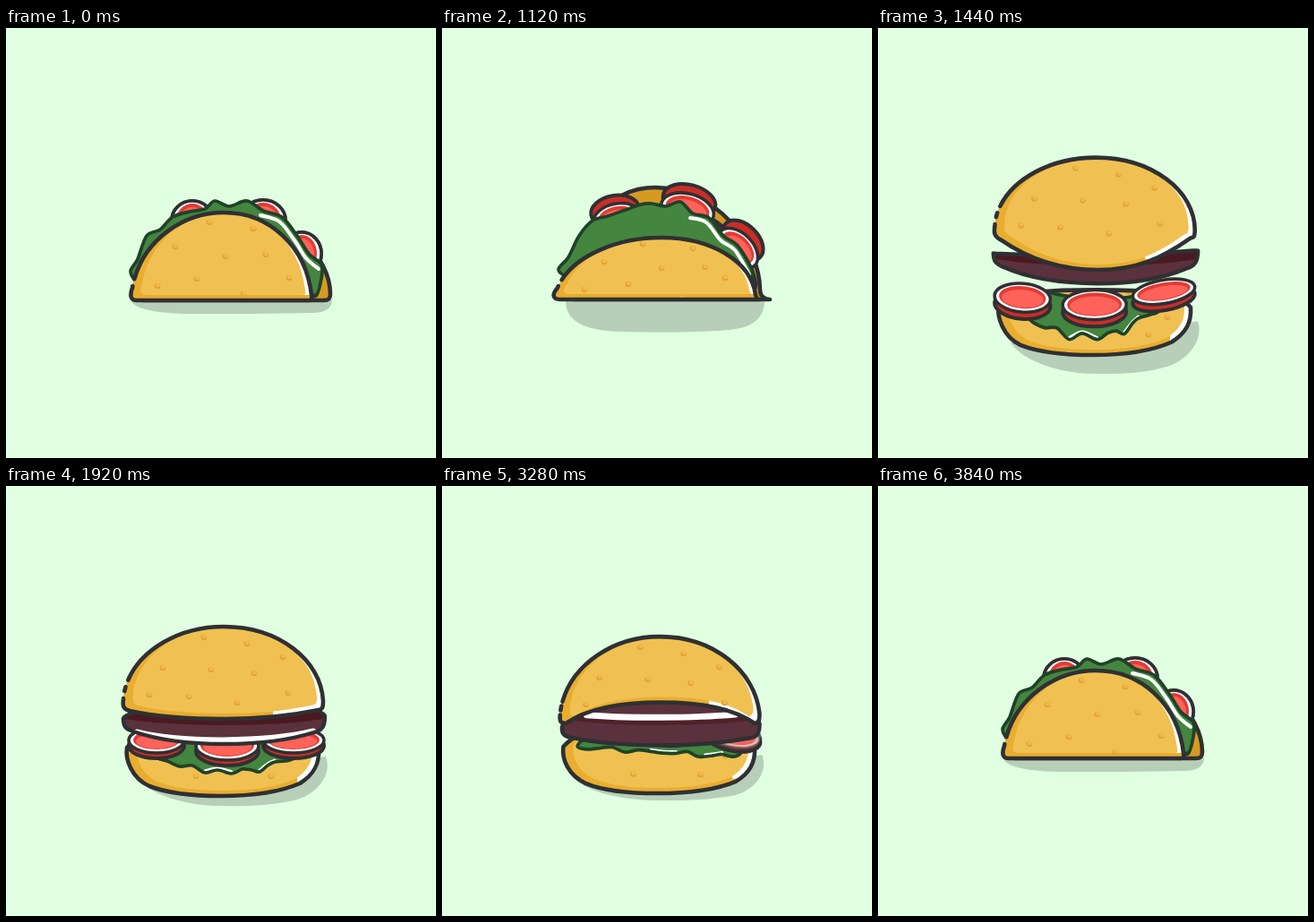
These frames come from a looping animation (480 by 480 pixels, 4.64 s). An HTML page with a canvas:

```html
<!DOCTYPE html>
<html lang="en">
<head>
<meta charset="utf-8">
<title>Taco and burger</title>
<style>
html, body { margin: 0; width: 100%; height: 100%; overflow: hidden; background: #e1ffe1; }
canvas { display: block; width: 100vw; height: 100vh; }
</style>
</head>
<body>
<canvas id="stage"></canvas>
<script>
const LOOP = 4640, STEP = 40, SIZE = 480;
const INK = '#2f3033', LEAF_INK = '#1f4228';
const GOLD = [240, 193, 82], SHADE = [233, 173, 47], INSIDE = [214, 154, 34];

// Poses: 0 taco, 1 tilting, 2 opening, 3 burger.
const nums = s => s.match(/-?[\d.]+/g).map(Number);
const poses = (...list) => list.map(nums);

const shadow = poses(
  'M140 304C142 313 165 318 200 319C250 319 300 319 345 318C358 317 364 312 364 303',
  'M138 304C138 325 155 338 200 339C250 340 280 340 320 337C345 335 360 325 360 304',
  'M140 318C150 332 190 339 230 340C270 341 300 340 330 337C352 332 364 318 358 297',
  'M146 325C160 345 200 356 235 357C275 358 300 356 325 350C350 342 364 320 357 302');

const topBun = poses(
  'M150 298C153 247 195 207 255 207C315 207 362 255 362 297C362 303 359 304 355 304C310 304 290 304 250 304C210 304 170 304 153 304C150 304 149 302 150 298',
  'M145 290C148 235 180 178 238 178C305 178 354 240 355 292C355 300 361 303 366 303C310 303 290 303 250 303C210 303 170 303 148 303C145 303 144 300 145 290',
  'M133 288C137 232 185 187 243 187C302 187 345 228 355 276C356 284 354 290 350 291C335 236 296 210 243 210C190 210 152 238 140 288C136 293 133 292 133 288',
  'M131 238C134 195 182 157 243 157C305 157 352 195 354 240C354 248 353 249 349 250C320 256 290 260 245 260C200 260 165 257 138 251C131 249 130 246 131 238');

const patty = poses(
  'M150 290C155 245 200 212 250 212C300 212 340 245 348 290C348 298 346 300 340 300C310 300 290 300 250 300C210 300 180 300 158 300C152 300 150 296 150 290',
  'M145 285C150 235 190 198 245 198C300 198 340 235 350 285C350 295 345 300 340 300C310 300 290 300 250 300C210 300 180 300 158 300C150 300 145 295 145 285',
  'M139 285C150 238 190 210 243 210C296 210 338 240 352 280C352 290 350 292 345 292C310 292 280 292 243 292C200 292 170 292 145 292C140 292 138 290 139 285',
  'M131 260C131 250 190 246 243 246C300 246 355 246 356 257C356 268 353 273 344 275C315 284 285 288 245 288C200 288 165 282 142 274C133 271 131 268 131 260');

const pattyShine = poses(
  'M200 235C225 220 265 220 300 235',
  'M190 225C225 208 260 208 300 225',
  'M188 223C223 212 263 212 300 223',
  'M146 275C192 287 290 287 343 274');

const bottomBun = poses(
  'M141 290C150 240 195 206 243 206C295 206 335 245 341 298C342 304 340 304 338 304C310 304 280 304 245 304C210 304 175 304 146 304C139 304 138 299 141 290',
  'M129 290C142 258 190 234 245 234C300 234 345 260 350 298C352 303 352 303 354 303C310 303 280 303 245 303C210 303 170 303 132 303C124 303 122 298 129 290',
  'M136 290C150 268 195 250 243 250C295 250 335 268 349 290C350 305 342 319 328 326C305 335 275 338 240 338C205 338 180 335 162 327C142 318 135 305 136 290',
  'M135 292C150 275 195 270 243 270C295 270 335 275 349 294C350 310 344 322 328 332C305 342 275 346 240 346C205 346 180 343 160 335C140 326 133 305 135 292');

// Upper edge left to right, then lower edge back.
const lettuce = poses(
  '139 272 147 258 157 232 172 225 186 211 205 205 222 202 233 193 249 199 269 193 287 204 308 211 325 232 338 252 352 264 ' +
  '352 280 346 298 335 290 326 262 312 244 300 232 285 222 270 216 256 214 243 214 225 216 205 222 180 238 160 262 148 283',
  '130 270 141 256 153 232 168 215 185 210 205 203 222 197 234 196 250 199 266 194 280 207 298 212 314 232 330 243 346 270 ' +
  '346 285 342 290 332 272 320 264 310 256 298 252 286 248 272 245 258 244 245 244 230 244 212 246 190 252 165 264 145 278',
  '136 291 146 274 160 262 175 253 190 246 205 241 220 238 233 236 248 235 265 237 282 240 300 246 318 255 335 267 350 284 ' +
  '352 291 344 294 334 285 321 282 312 273 303 276 290 263 278 260 265 266 253 256 238 265 222 270 206 265 180 274 160 287',
  '160 290 170 284 182 280 194 280 206 280 218 280 230 280 242 280 254 280 266 280 278 280 290 280 302 280 314 282 326 290 ' +
  '322 303 312 307 300 308 292 312 283 319 274 317 264 316 252 321 236 317 222 320 208 312 194 313 180 307 170 304 162 298');

// cx, cy, rx, ry, angle, rim dx, rim dy, face opacity
const tomatoes = [
  poses('208 215 23 22 0 0 0 1', '196 213 27 17 -10 -3 -9 1', '192 240 30 7 -17 0 0 0', '168 284 31 14 0 0 6 1'),
  poses('287 215 25 23 0 0 0 1', '274 203 30 18 15 2 -10 1', '266 239 33 14 3 0 0 0', '247 290 35 16 0 0 6 1'),
  poses('330 252 22 24 0 0 0 1', '330 246 27 17 45 6 -9 1', '328 264 30 17 35 0 0 0', '321 284 34 14 0 0 6 1')];

const bottomDots = poses(
  '227 217 276 224 189 244 245 255 290 253 316 279 169 288 213 280 265 297',
  '224 241 280 246 181 261 245 268 294 267 316 279 159 292 208 286 267 302',
  '224 256 280 252 191 279 249 286 290 273 309 297 120 330 216 318 276 319',
  '224 270 280 272 191 285 249 290 290 292 320 304 110 340 212 324 296 324');
const topDots = nums('221 169 269 176 175 203 229 205 277 209 309 191 160 233 204 235 258 242 315 231');

const glint = poses('280 298', '285 297', '322 321', '325 330'); // left and lower limits
const gap = poses('8', '8', '0.01', '0.01');

// time, value
const poseTrack = [[0, 0], [880, 0], [960, .12], [1040, .5], [1120, 1], [1240, 2], [1360, 3], [1440, 3.28],
  [1520, 3.12], [1600, 2.95], [1720, 3.03], [1840, 2.99], [1920, 3], [3080, 3], [3160, 3.2], [3240, 3.05],
  [3340, 2], [3440, 1], [3520, .55], [3560, .36], [3600, .2], [3640, .08], [3720, -.05], [3840, 0], [LOOP, 0]];
const topTrack = [[0, 0], [1360, 0], [1440, -4], [1560, 4], [1680, -2], [1920, 0], [3080, 0], [3160, -6], [3280, 0], [LOOP, 0]];
const lowTrack = [[0, 0], [1320, 0], [1360, 4], [1440, 24], [1560, -5], [1680, 3], [1920, 0], [3080, 0], [3160, 5], [3280, 0], [LOOP, 0]];

const canvas = document.getElementById('stage');
const g = canvas.getContext('2d');
const clamp = v => Math.max(0, Math.min(1, v));
const mix = (a, b, k) => a.map((v, i) => v + (b[i] - v) * k);
const rgb = c => `rgb(${c.map(Math.round)})`;

function valueAt(track, t) {
  const i = Math.max(1, track.findIndex(k => k[0] > t));
  const [a, u] = track[i - 1], [b, v] = track[i];
  return u + (v - u) * (t - a) / (b - a);
}

function at(shape, p) {
  const i = Math.max(0, Math.min(2, Math.floor(p)));
  return mix(shape[i], shape[i + 1], p - i);
}

function curve(n, closed = true) {
  const path = new Path2D();
  path.moveTo(n[0], n[1]);
  for (let i = 2; i < n.length; i += 6) path.bezierCurveTo(...n.slice(i, i + 6));
  if (closed) path.closePath();
  return path;
}

function spline(n, closed = true) {
  const count = n.length / 2, path = new Path2D();
  const pt = i => {
    const j = closed ? (i + count) % count : Math.max(0, Math.min(count - 1, i));
    return [n[2 * j], n[2 * j + 1]];
  };
  path.moveTo(n[0], n[1]);
  for (let i = 0; i < (closed ? count : count - 1); i++) {
    const [a, b, c, d] = [pt(i - 1), pt(i), pt(i + 1), pt(i + 2)];
    path.bezierCurveTo(b[0] + (c[0] - a[0]) / 6, b[1] + (c[1] - a[1]) / 6,
      c[0] - (d[0] - b[0]) / 6, c[1] - (d[1] - b[1]) / 6, c[0], c[1]);
  }
  return path;
}

function fill(path, color) { g.fillStyle = color; g.fill(path); }
function line(path, color, width) {
  g.strokeStyle = color;
  g.lineWidth = width;
  g.stroke(path);
}
function clipped(path, draw) {
  g.save();
  g.clip(path);
  draw();
  g.restore();
}
function disc(x, y, rx, ry, angle = 0) {
  const path = new Path2D();
  path.ellipse(x, y, Math.max(.1, rx), Math.max(.1, ry), angle, 0, Math.PI * 2);
  return path;
}

function dots(n) {
  for (let i = 0; i < n.length; i += 2) {
    fill(disc(n[i], n[i + 1], 3.4, 3.2), '#e3a432');
    fill(disc(n[i] + .5, n[i + 1] - 1, 2.5, 2.2), '#f1b94a');
  }
}

// A bread piece: shaded left and below, glossy on the right.
function bread(n, light, shade, limits, shine, dash, drawDots) {
  const path = curve(n);
  const [left, top, right, bottom] = [n[0], n[7], n[12], n[25]];
  fill(path, rgb(shade));
  clipped(path, () => {
    g.globalAlpha = shine;
    g.fillStyle = '#fff';
    g.fillRect(limits[0], 0, SIZE, limits[1]);
    g.globalAlpha = 1;
    g.save();
    const sx = (right - left - 18) / (right - left), sy = (bottom - top - 6) / (bottom - top);
    g.translate(left + 11, top);
    g.scale(sx, sy);
    g.translate(-left, -top);
    fill(path, rgb(light));
    g.restore();
    drawDots();
  });
  g.setLineDash(dash);
  line(path, INK, 4.6);
  g.setLineDash([]);
}

function drawTopBun(p) {
  const n = at(topBun, p), k = clamp((p - 2) * 1.8);
  const pos = topDots.map((v, i) => i % 2 ? n[7] + v - 157 : n[0] + (v - 131) * (n[12] - n[0]) / 223);
  const hole = 8 * clamp(p - 2) + .01;
  bread(n, mix(INSIDE, GOLD, k), mix(INSIDE, SHADE, k), [298, 262], k, [1, hole, 5, hole, 3000], () => {
    g.globalAlpha = k;
    dots(pos);
    g.globalAlpha = 1;
  });
}

function drawBottomBun(p) {
  const hole = Math.max(.01, at(gap, p)[0]);
  bread(at(bottomBun, p), GOLD, SHADE, at(glint, p), 1, [2, hole, 3000], () => dots(at(bottomDots, p)));
}

function drawPatty(p) {
  const path = curve(at(patty, p));
  fill(path, '#5a313c');
  clipped(path, () => {
    g.globalAlpha = clamp((p - 2.3) * 2);
    line(curve(nums('M134 254C190 263 300 263 353 254'), false), '#4a1921', 12);
    g.globalAlpha = 1;
    line(curve(at(pattyShine, p), false), '#fff', 7);
  });
  line(path, INK, 4.4);
}

function drawTomatoes(p) {
  for (const t of tomatoes) {
    const [x, y, rx, ry, deg, dx, dy, face] = at(t, p);
    const a = deg * Math.PI / 180;
    const rim = disc(x + dx, y + dy, rx, ry, a), front = disc(x, y, rx, ry, a);
    fill(rim, '#c92e27');
    line(rim, INK, 4);
    g.globalAlpha = clamp(face);
    fill(front, '#fff');
    fill(disc(x, y - .5, rx - 5, ry - 3.5, a), '#e23b34');
    fill(disc(x, y + 1, rx - 8, ry - 6, a), '#ff6259');
    line(front, INK, 3.6);
    g.globalAlpha = 1;
  }
}

function drawLettuce(p) {
  const n = at(lettuce, p), path = spline(n);
  const edge = (from, to, dx, dy) =>
    spline(n.slice(from * 2, to * 2 + 2).map((v, i) => v + (i % 2 ? dy : dx)), false);
  fill(path, '#44853f');
  clipped(path, () => {
    g.globalAlpha = clamp(2 - p);
    line(edge(10, 14, -3, 5), '#fff', 4);
    g.globalAlpha = clamp(p - 1);
    line(edge(17, 19, 0, -2), '#fff', 3);
    line(edge(22, 24, 0, -2), '#fff', 3);
    g.globalAlpha = 1;
  });
  line(path, LEAF_INK, 3.7);
}

function layers(p) {
  if (p < 1.3) return [drawTopBun, drawPatty, drawTomatoes, drawLettuce, drawBottomBun];
  if (p < 2.05) return [drawTopBun, drawPatty, drawTomatoes, drawBottomBun, drawLettuce];
  if (p < 2.4) return [drawPatty, drawTomatoes, drawBottomBun, drawLettuce, drawTopBun];
  return [drawBottomBun, drawLettuce, drawTomatoes, drawPatty, drawTopBun];
}

function render(time) {
  const t = Math.floor((time % LOOP) / STEP) * STEP;
  const p = valueAt(poseTrack, t), up = valueAt(topTrack, t), down = valueAt(lowTrack, t);
  const shift = new Map([[drawTopBun, up], [drawPatty, up * .4], [drawTomatoes, down * .2],
    [drawLettuce, down * .4], [drawBottomBun, down * .7]]);
  const w = Math.round(innerWidth * devicePixelRatio), h = Math.round(innerHeight * devicePixelRatio);
  if (canvas.width !== w || canvas.height !== h) { canvas.width = w; canvas.height = h; }
  g.setTransform(w / SIZE, 0, 0, h / SIZE, 0, 0);
  g.lineCap = g.lineJoin = 'round';
  g.fillStyle = '#e1ffe1';
  g.fillRect(0, 0, SIZE, SIZE);
  g.save();
  g.translate(0, down);
  fill(curve(at(shadow, p)), '#b7cfb8');
  g.restore();
  for (const draw of layers(p)) {
    g.save();
    g.translate(0, shift.get(draw));
    draw(p);
    g.restore();
  }
}

const start = performance.now();
function tick() {
  render(performance.now() - start);
  requestAnimationFrame(tick);
}
tick();
</script>
</body>
</html>
```
